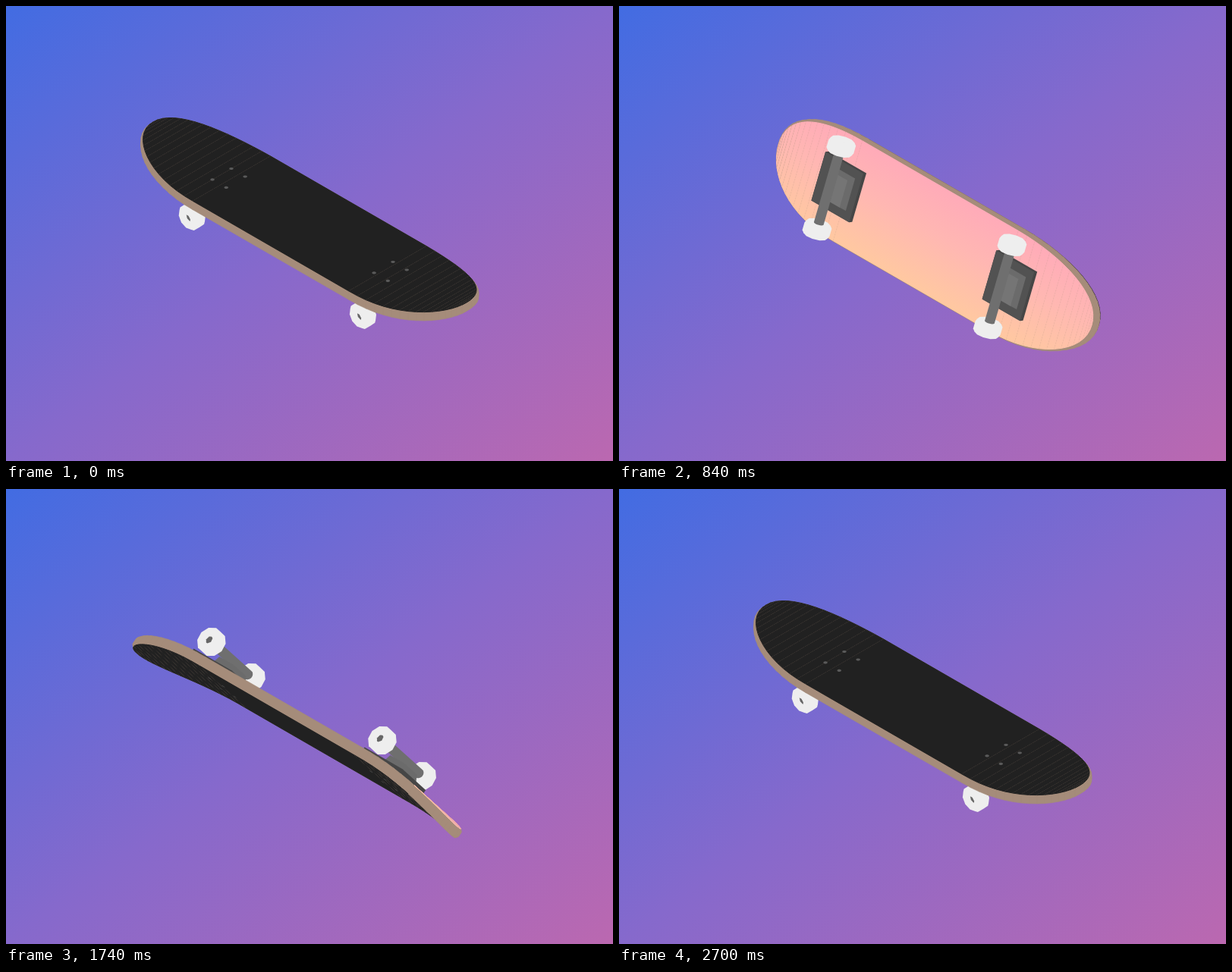
An HTML page with a canvas for the animation above (2.73 s loop, 800 by 600 pixels).

```html
<!DOCTYPE html>
<html lang="en">
<head>
<meta charset="utf-8">
<title>Kickflip</title>
<style>
  html, body { margin: 0; width: 100%; height: 100%; overflow: hidden; }
  body { background: linear-gradient(to bottom right, #426ce2, #8669cc 50%, #bb68b0); }
  canvas { display: block; }
</style>
</head>
<body>
<canvas id="stage" width="800" height="600"></canvas>
<script>
const ctx = document.getElementById('stage').getContext('2d');
const STEP = 30, LOOP = 2730, TURN = 4 * Math.PI / 180;
const WOOD = '#a58c7a', GRIP = '#212121', WHITE = '#eeeeee';
const HALF_LEN = 241, HALF_WIDTH = 61, FLAT = 120, KICK = 130;
const MID = 11, THICK = 5.7;
let c = 1, s = 0;

// Isometric projection; the board turns about its long axis (x).
function project([x, y, z]) {
  const v = c * y + s * z, w = c * z - s * y;
  return [400.3 + 0.866 * (x + v), 303.7 + 0.5 * (x - v) - w];
}

const cross = (o, a, b) => (a[0] - o[0]) * (b[1] - o[1]) - (a[1] - o[1]) * (b[0] - o[0]);

function hull(points) {
  const sorted = points.map(project).sort((a, b) => a[0] - b[0] || a[1] - b[1]);
  const chain = list => {
    const out = [];
    for (const p of list) {
      while (out.length > 1 && cross(out[out.length - 2], out[out.length - 1], p) <= 0) out.pop();
      out.push(p);
    }
    out.pop();
    return out;
  };
  return chain(sorted).concat(chain(sorted.reverse()));
}

function trace(points) {
  ctx.beginPath();
  points.forEach(p => ctx.lineTo(p[0], p[1]));
  ctx.closePath();
}

function paint(points, color, line = 0) {
  trace(points);
  ctx.fillStyle = color;
  ctx.fill();
  if (line) {
    ctx.strokeStyle = color;
    ctx.lineWidth = line;
    ctx.stroke();
  }
}

// Ring of points around the y axis.
function ring(x, y, z, r, sides) {
  return Array.from({ length: sides }, (_, i) => {
    const a = (i + 0.3) / sides * 2 * Math.PI;
    return [x + r * Math.cos(a), y, z + r * Math.sin(a)];
  });
}

const rect = (x0, x1, w, z) => [[x0, -w, z], [x1, -w, z], [x1, w, z], [x0, w, z]];

// Outline stations from nose to tail: [x, half width].
const stations = (() => {
  const end = [], n = 16, p = 2 / 2.1;
  for (let i = 0; i <= n; i++) {
    const a = i / n * Math.PI / 2;
    const u = i === n ? 0 : Math.cos(a) ** p;
    end.push([FLAT + (HALF_LEN - FLAT) * u, HALF_WIDTH * Math.sin(a) ** p]);
  }
  return end.map(([x, w]) => [-x, w]).concat(end.reverse());
})();

const lift = x => 15 * (Math.max(0, Math.abs(x) - KICK) / (HALF_LEN - KICK)) ** 2;

const slabs = stations.slice(1).map((b, i) => {
  const rim = [];
  const faces = [THICK, -THICK].map(h => {
    const [p, q] = [stations[i], b].map(([x, w]) => {
      const z = MID + lift(x), xi = x * 0.989, wi = w * 0.97;
      rim.push([x, w, z + h / 2], [x, -w, z + h / 2], [xi, wi, z + h], [xi, -wi, z + h]);
      return [[xi, -wi, z + h], [xi, wi, z + h]];
    });
    return [p[0], q[0], q[1], p[1]];
  });
  return { rim, top: faces[0], bottom: faces[1] };
});

function facing(q) {
  let area = 0;
  q.forEach((p, i) => {
    const n = q[(i + 1) % q.length];
    area += p[0] * n[1] - p[1] * n[0];
  });
  return area;
}

// Pink to peach across the width, with bands running along the strip.
function sunset(strip) {
  const [p, q] = strip;
  const a = project([p[0], -HALF_WIDTH, p[2]]);
  const b = project([p[0], HALF_WIDTH, p[2]]);
  const e = project([q[0], -HALF_WIDTH, q[2]]);
  const nx = a[1] - e[1], ny = e[0] - a[0];
  const k = ((b[0] - a[0]) * nx + (b[1] - a[1]) * ny) / (nx * nx + ny * ny);
  const g = ctx.createLinearGradient(a[0], a[1], a[0] + nx * k, a[1] + ny * k);
  g.addColorStop(0, '#ffaab9');
  g.addColorStop(0.45, '#ffb7b2');
  g.addColorStop(1, '#ffc9a0');
  return g;
}

function drawBolts() {
  for (const cx of [-121, 125]) for (const dx of [-10.5, 10.5]) for (const dy of [-14.4, 14.4]) {
    const dot = Array.from({ length: 12 }, (_, i) => {
      const a = i * Math.PI / 6;
      return project([cx + dx + 2.3 * Math.cos(a), dy - 2.2 + 2.3 * Math.sin(a), 17.4]);
    });
    paint(dot, '#5a5a5a');
  }
}

function drawDeck(topUp) {
  if (!topUp) slabs.forEach(d => paint(d.top.map(project), GRIP, 1.4));
  for (const d of slabs) {
    paint(hull(d.rim), WOOD, 0.6);
    const top = d.top.map(project), bottom = d.bottom.map(project);
    if (facing(top) < 0) paint(top, GRIP, 1);
    if (facing(bottom) > 0) paint(bottom, sunset(d.bottom), 1);
  }
  if (topUp) drawBolts();
}

function drawWheel(x, side) {
  const z = -13.5, at = d => side * (49 + d);
  paint(hull([
    ...ring(x, at(-7.5), z, 13, 10), ...ring(x, at(-4.5), z, 15.2, 10),
    ...ring(x, at(4.5), z, 15.2, 10), ...ring(x, at(7.5), z, 13, 10)
  ]), WHITE);
  if (side * (c + s) >= 0) return;
  // The hub sits inside a hole in the outer face.
  ctx.save();
  trace(ring(x, at(7.5), z, 5, 7).map(project));
  ctx.clip();
  paint(ring(x, at(3.8), z, 5, 7).map(project), '#666666');
  ctx.restore();
}

function drawTruck(x, topUp) {
  const near = c + s > 0 ? -1 : 1;
  const plate = () => {
    const face = rect(x - 28.8, x + 28.8, 28.8, 0);
    paint(hull([...face, ...rect(x - 28.8, x + 28.8, 28.8, 5)]), '#464646');
    if (!topUp) paint(face.map(project), '#525252');
  };
  const block = () => {
    const face = rect(x - 4, x + 17, 16, -8);
    paint(hull([...face, ...rect(x - 4, x + 20, 19, 0)]), '#6b6b6b');
    if (!topUp) paint(face.map(project), '#757575');
  };
  const axle = () => paint(hull([
    ...ring(x, -42, -13.5, 5.4, 20), ...ring(x, 42, -13.5, 5.4, 20)
  ]), '#6f6f6f');
  const parts = [plate, block, axle];
  if (topUp) parts.reverse();
  drawWheel(x, -near);
  parts.forEach(part => part());
  drawWheel(x, near);
}

function draw() {
  const angle = Math.floor(performance.now() % LOOP / STEP) * TURN;
  c = Math.cos(angle);
  s = Math.sin(angle);
  const topUp = c > s;
  const trucks = () => [-130, 130].forEach(x => drawTruck(x, topUp));
  ctx.clearRect(0, 0, 800, 600);
  ctx.lineJoin = 'round';
  if (topUp) trucks();
  drawDeck(topUp);
  if (!topUp) trucks();
  requestAnimationFrame(draw);
}
draw();
</script>
</body>
</html>
```
